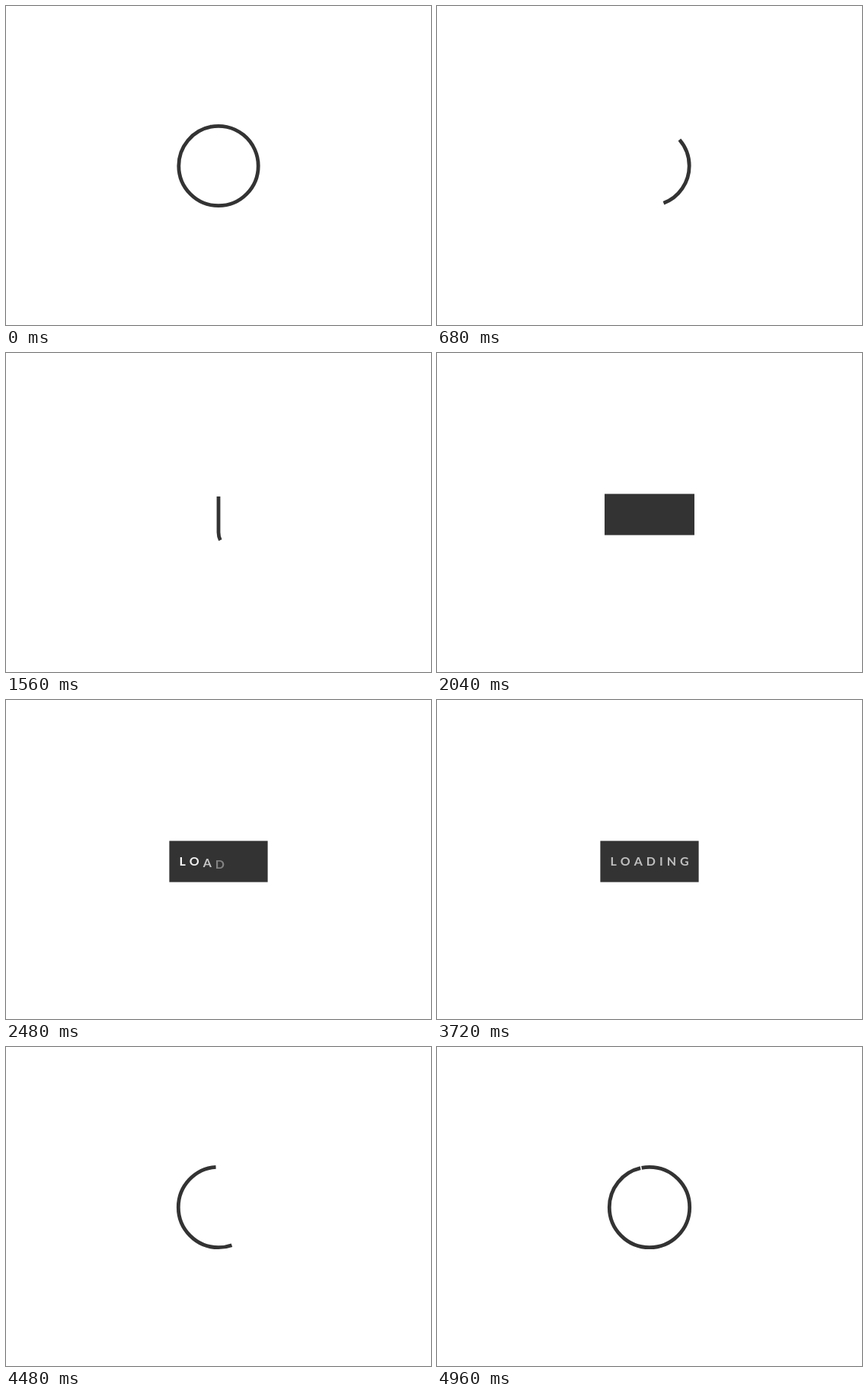
An HTML page with a canvas that plays this animation: 558 px wide and 418 px high, repeating every 5000 ms.

```html
<!DOCTYPE html>
<html>
<head>
<meta charset="utf-8">
<title>Loading</title>
<style>
html, body { margin: 0; width: 558px; height: 418px; overflow: hidden; background: #fff; }
canvas { display: block; }
</style>
</head>
<body>
<canvas width="558" height="418"></canvas>
<script>
const ctx = document.querySelector('canvas').getContext('2d');
const LOOP = 5000, CX = 279, STROKE = 4.8;
const BOX = { w: 129.2, top: 184.6, h: 54 };
const BOTTOM = BOX.top + BOX.h;

const span = (t, from, to) => Math.min(1, Math.max(0, (t - from) / (to - from)));
const smooth = x => x * x * (3 - 2 * x);
const mix = (a, b, k) => a + (b - a) * k;

// Chain of clockwise arcs through the given angles in degrees
function arcs(r, cy, angles) {
  return angles.map(deg => {
    const a = deg * Math.PI / 180;
    return `A${r} ${r} 0 0 1 ${CX + r * Math.cos(a)} ${cy + r * Math.sin(a)}`;
  }).join('');
}

function makeTrack(d, r) {
  const el = document.createElementNS('http://www.w3.org/2000/svg', 'path');
  el.setAttribute('d', d);
  return { path: new Path2D(d), length: el.getTotalLength(), lap: 2 * Math.PI * r };
}

const R1 = 52.2, Y1 = 209.5, R2 = 52.7, Y2 = 210, SEAM = 258;
const start = arcs(R1, Y1, [SEAM]).split(' ').slice(-2).join(' ');
const leave = makeTrack(
  `M${start}${arcs(R1, Y1, [360, 540, 720, 900, 1080])}` +
  `C${CX + R1} 270 ${CX} 265 ${CX} 235V${BOX.top}`, R1);
const arrive = makeTrack(
  `M${CX} ${BOTTOM}V185C${CX} 155 ${CX + R2} 150 ${CX + R2} ${Y2}` +
  arcs(R2, Y2, [180, 360, 540, 360 + SEAM]), R2);

function drawPart(track, tail, head) {
  ctx.setLineDash([head - tail, 9999]);
  ctx.lineDashOffset = -tail;
  ctx.stroke(track.path);
}

function drawBox(k) {
  const w = mix(STROKE, BOX.w, k);
  ctx.fillRect(CX - w / 2, BOX.top, w, BOX.h);
}

function drawWord(t) {
  ctx.font = 'bold 16px Lato, sans-serif';
  const fade = 1 - span(t, 3690, 3790);
  let x = 227.4;
  [...'LOADING'].forEach((letter, i) => {
    const p = span(t, 2250 + 60 * i, 2480 + 60 * i);
    const k = p * (2 - p);
    ctx.fillStyle = `rgba(255,255,255,${k * fade})`;
    ctx.fillText(letter, x, 217 + 6 * (1 - k));
    x += ctx.measureText(letter).width + 5;
  });
}

function draw(t) {
  ctx.clearRect(0, 0, 558, 418);
  ctx.strokeStyle = ctx.fillStyle = '#333';
  ctx.lineWidth = STROKE;
  if (t < 1745) {
    const x = span(t, 100, 1675);
    const tail = x + x * x - x * x * x;
    const head = smooth(span(t, 100, 1640)) ** 1.14;
    drawPart(leave, tail * (leave.length - BOX.h), mix(leave.lap + 0.6, leave.length, head));
  } else if (t < 3950) {
    const x = span(t, 1745, 2280);
    const open = smooth(x) + 5.4 * (x * (1 - x)) ** 2; // slight overshoot
    drawBox(open * (1 - smooth(span(t, 3720, 3950))));
    drawWord(t);
  } else {
    const tail = smooth(span(t, 3950, 4940));
    const head = smooth(span(t, 3950, 4995));
    drawPart(arrive, tail * (arrive.length - arrive.lap), mix(BOX.h, arrive.length, head));
  }
}

const begin = performance.now();
function tick() {
  draw((performance.now() - begin) % LOOP);
  requestAnimationFrame(tick);
}
tick();
</script>
</body>
</html>
```
